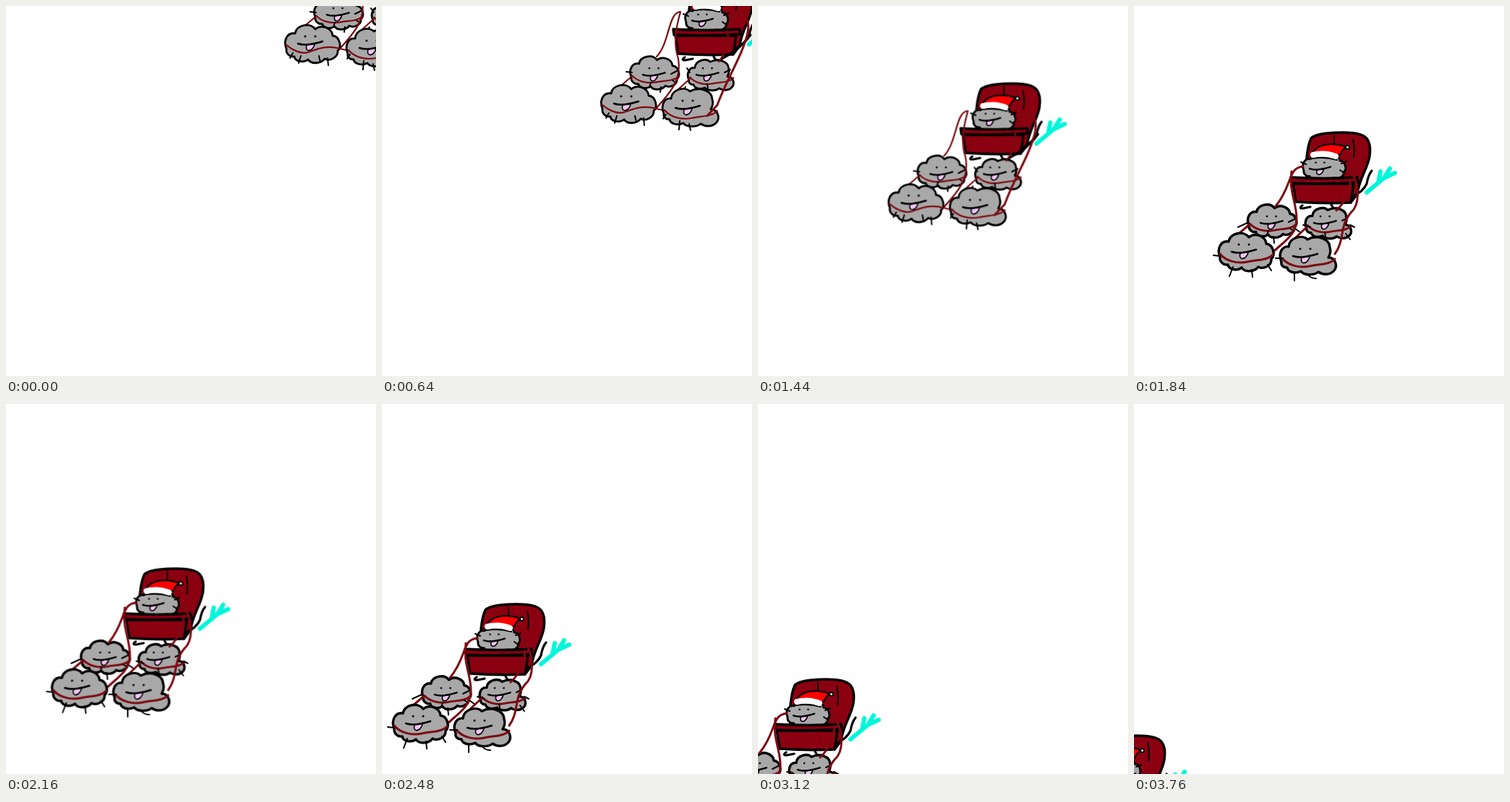
Write an HTML page without scripts that moves like this. It is 512 px wide and 512 px high and loops after 3.84 s.

```html
<!DOCTYPE html>
<html lang="en">
<head>
<meta charset="utf-8">
<title>Cloud sleigh</title>
<style>
  html, body { margin: 0; height: 100%; overflow: hidden; background: #fff; }
  svg { display: block; width: 100%; height: 100%; }
  path, use { stroke-linecap: round; stroke-linejoin: round; vector-effect: non-scaling-stroke; }

  .ride { animation: ride 3840ms -2ms infinite; }
  .step { --outline: 2.8; --cord: 2.2; animation: blink 160ms -2ms step-end infinite; }
  .step.late { --outline: 3.4; --cord: 3; animation-delay: -82ms; }

  .ink { fill: none; stroke: #000; stroke-width: 2; }
  .heavy { stroke-width: 3.2; }
  .wood { fill: #8b0010; stroke: #000; stroke-width: 3.4; }
  .wool { fill: #a8a8a8; stroke: #000; stroke-width: var(--outline, 2.8); }
  .rope { fill: none; stroke: #7d0a12; stroke-width: var(--cord); }
  .splash { fill: none; stroke: #00f6da; stroke-width: 6; }

  @keyframes blink { 50% { opacity: 0; } }

  /* Each leg of the ride moves once every 80 ms. */
  @keyframes ride {
    0%      { transform: translate(143px, -152px); animation-timing-function: steps(7); }
    14.583% { transform: translate(72px, -81px); animation-timing-function: steps(1); }
    16.666% { transform: translate(60px, -69px); animation-timing-function: steps(5); }
    27.083% { transform: translate(0, 0); animation-timing-function: steps(1); }
    29.166% { transform: translate(-14px, 14px); animation-timing-function: steps(7); }
    43.75%  { transform: translate(-99px, 109px); animation-timing-function: steps(2); }
    47.916% { transform: translate(-126px, 136px); animation-timing-function: steps(5); }
    58.333% { transform: translate(-193px, 202px); animation-timing-function: steps(3); }
    64.583% { transform: translate(-228px, 238px); animation-timing-function: steps(4); }
    72.916% { transform: translate(-273px, 287px); animation-timing-function: steps(4); }
    81.25%  { transform: translate(-320px, 342px); animation-timing-function: steps(3); }
    87.5%   { transform: translate(-359px, 380px); animation-timing-function: steps(5); }
    97.916%, 100% { transform: translate(-410px, 420px); }
  }
</style>
</head>
<body>
<svg viewBox="0 0 512 512">
  <defs>
    <path id="puff" d="M-36 6C-41 -6 -34 -17 -24 -15C-22 -27 -3 -31 4 -21C12 -28 27 -23 28 -12C38 -11 41 4 35 9C36 18 24 24 17 20C12 27 -2 28 -6 21C-12 26 -24 24 -25 17C-32 18 -37 12 -36 6Z"/>
    <path id="lobedPuff" d="M-37 8C-42 -4 -36 -14 -27 -13C-26 -26 -8 -30 -1 -23C12 -30 30 -24 30 -12C32 -6 30 -2 28 2C38 2 41 14 36 20C30 27 20 26 14 22C8 27 -6 27 -10 21C-18 25 -28 22 -29 16C-35 16 -38 12 -37 8Z"/>
    <path id="strap" d="M-36 2C-28 12 -12 16 2 13S30 11 37 3"/>
    <path id="wavyStrap" d="M-37 0C-28 8 -16 14 -6 11S18 0 38 6"/>
    <g id="face">
      <circle cx="-10" cy="-11" r="1.5"/>
      <circle cx="4" cy="-11" r="1.5"/>
      <path d="M-8 1C-10 9 -5 10 -1 7Q3 3 3 -1Z" fill="#f2c4f4" stroke="#000" stroke-width="1.6"/>
      <path class="ink" style="stroke-width:2.5" d="M-20 -1C-12 2 -2 1 14 -4"/>
    </g>

    <g id="sleigh">
      <path class="wood" d="M365 104C363 86 365 60 371 47C380 38 425 37 440 42C452 46 454 58 452 72C449 90 438 102 435 124L426 136L424 104Z"/>
      <path class="ink" d="M429 49Q432 61 430 74M403 43V54"/>
      <path class="ink heavy" d="M428 128Q443 121 448 110Q450 98 455 92"/>
      <use href="#puff" class="wool" transform="translate(389 87) scale(.78 .74)"/>
      <path class="ink" d="M357 80L364 83M413 82L420 79M411 91L418 96"/>
      <use href="#face" transform="translate(386 90) scale(.85)"/>
      <path d="M373 67C380 56 398 51 420 59Q414 62 411 70Z" fill="#f00" stroke="#000" stroke-width="2.2"/>
      <path class="ink" d="M372 75Q390 72 407 77"/>
      <path d="M374 70Q390 66 405 72" fill="none" stroke="#fff" stroke-width="8"/>
      <circle cx="421.500" cy="59.500" r="2.500" fill="#fff" stroke="#000" stroke-width="2"/>
      <path class="wood" d="M346 110L350 135Q390 138 426 136L430 110Z"/>
      <path class="wood" d="M343 101Q390 104 435 101L436 108Q390 111 344 109Z"/>
      <path class="ink heavy" d="M359 140Q353 144 360 144L370 142M399 139L402 144H410"/>
      <path class="splash" d="M448 122L472 102L487 95M464 109L467 93M472 102L480 89"/>
    </g>

    <g id="backTeam">
      <use href="#puff" class="wool" transform="translate(317 162) scale(.89 .87)"/>
      <use href="#strap" class="rope" transform="translate(318 164) scale(.87 .8)"/>
      <use href="#face" transform="translate(319 165) scale(.9)"/>
      <use href="#lobedPuff" class="wool" transform="translate(395 165) scale(.82 .81)"/>
      <use href="#strap" class="rope" transform="translate(396 166) scale(.82 .8)"/>
      <use href="#face" transform="translate(393 165) scale(.9)"/>
      <path class="ink" d="M340 163L348 159M342 172L347 175M414 161L422 157M310 181L312 175M391 183L390 177"/>
    </g>
    <g id="frontTeam">
      <use href="#puff" class="wool" transform="translate(281 205)"/>
      <use href="#face" transform="translate(281 205)"/>
      <use href="#lobedPuff" class="wool" transform="translate(367 210)"/>
      <use href="#strap" class="rope" transform="translate(367 211)"/>
      <use href="#face" transform="translate(366 211)"/>
    </g>
  </defs>

  <g class="ride">
    <use href="#sleigh"/>

    <g class="step">
      <path class="ink heavy" d="M410 142Q435 130 450 109"/>
      <use href="#backTeam"/>
      <path class="ink" d="M278 160L286 161M326 181L325 188M362 155L366 161M356 187L360 181"/>
      <path class="rope" d="M320 139C338 121 336 77 353 77C345 105 344 124 350 142C355 170 340 188 319 211L332 214M285 167L271 179M367 169L348 186M418 104Q422 124 406 146"/>
      <use href="#frontTeam"/>
      <use href="#wavyStrap" class="rope" transform="translate(281 205)"/>
      <path class="rope" style="--cord:3" d="M420 96C424 72 452 74 446 106C440 135 416 172 404 206L390 221"/>
      <path class="ink" d="M254 217L250 224M265 221L262 231M290 221L292 230M302 224L303 234M333 219L329 225M352 228L351 240M365 232L367 241"/>
    </g>

    <g class="step late">
      <use href="#backTeam"/>
      <path class="ink" d="M270 170L283 164M349 172L357 178M319 183L320 192M360 167L370 170M425 167L431 170M419 179L425 187"/>
      <path class="rope" d="M360 86C338 88 346 112 322 141M344 93C340 120 351 136 351 158C351 180 336 188 320 203M285 167L271 179M365 170L348 186M426 104Q424 130 406 147M424 88C440 112 438 140 426 150C410 168 418 188 404 207"/>
      <use href="#frontTeam"/>
      <use href="#strap" class="rope" transform="translate(281 205)"/>
      <path class="ink" d="M236 209L245 210M311 222L316 230M263 225L258 238M289 229L290 239M322 213L332 213M348 233V244M366 235Q370 241 378 241"/>
    </g>
  </g>
</svg>
</body>
</html>
```
